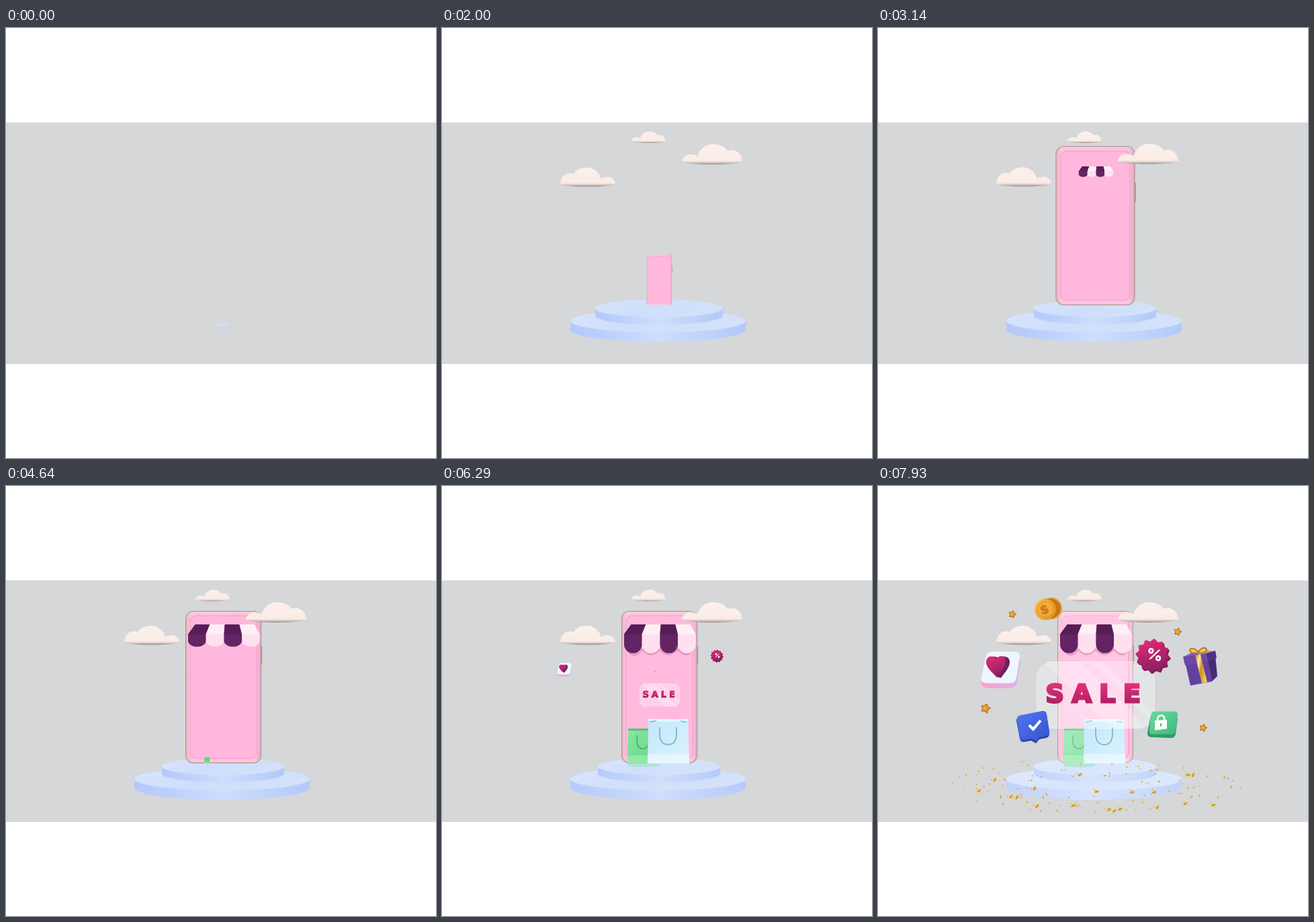
Write an HTML page that moves like this. It is 640 by 640 pixels and loops after 8 s.

```html
<!DOCTYPE html>
<html lang="en">
<head>
<meta charset="utf-8">
<title>Sale</title>
<style>
html, body { margin: 0; width: 100%; height: 100%; overflow: hidden; background: #fff; }
svg { display: block; width: 100%; height: 100%; }
text { text-anchor: middle; font: 900 20px Inter, Roboto, sans-serif; }
.a { animation: 8s ease-in-out infinite; }

#disc1 { transform-origin: 321.5px 442px; animation-name: disc1; }
#disc2 { transform-origin: 323px 423px; animation-name: disc2; }
#cloudL { transform-origin: 217px 222px; animation-name: cloudL; }
#cloudR { transform-origin: 402px 188px; animation-name: cloudR; }
#cloudT { transform-origin: 308px 163px; animation-name: cloudT; }
#phone { transform-origin: 323.5px 412px; animation-name: phone; }
#awning { transform-origin: 324.5px 206px; animation-name: awning; }
#drop { transform-origin: 324.5px 220px; animation-name: drop; }
#shade { animation-name: shade; }
#green { transform-origin: 299px 413px; animation-name: green; }
#strip { animation-name: strip; }
#blue { transform-origin: 337px 413px; animation-name: blue; }
#panel { transform-origin: 324px 311px; animation-name: panel; }
#heart { transform-origin: 182px 273px; animation-name: badge; }
#percent { transform-origin: 409px 253px; animation-name: badge; }
#coin { transform-origin: 253px 183px; animation-name: coin; }
#chat { transform-origin: 231px 357px; animation-name: chat; }
#tick { animation-name: tick; }
#lock { transform-origin: 423px 355px; animation-name: lock; }
#gift { transform-origin: 480px 269px; animation-name: gift; }
#confetti { transform-origin: 300px 355px; animation-name: confetti; }
.star { animation-name: star; }
.sheen { animation-name: sheen; }

@keyframes disc1 { 0% { transform: scale(.1) } 11.2% { transform: scale(1.1) } 16%, 100% { transform: none } }
@keyframes disc2 { 0%, 13% { transform: scale(0) } 22.5% { transform: scale(1.08) } 25% { transform: scale(1.044) } 28%, 100% { transform: none } }
@keyframes cloudL { 0% { transform: scale(.02) } 11.5% { transform: none } 39% { transform: translateY(-.6px) } 58%, 100% { transform: none } }
@keyframes cloudR { 0%, 10.5% { transform: scale(0) } 21% { transform: none } 39% { transform: translateY(-.6px) } 58%, 100% { transform: none } }
@keyframes cloudT { 0%, 13% { transform: scale(0) } 22.5%, 39% { transform: none } 58% { transform: translateY(.5px) } 68% { transform: none } 85.75%, 100% { transform: translateY(.5px) } }
@keyframes phone { 0%, 22.3% { transform: scale(0) } 25% { transform: scale(.33); animation-timing-function: ease-out } 34.5% { transform: scale(1.12) } 39.25% { transform: scale(1.045) } 43%, 100% { transform: none } }
@keyframes sheen { 0%, 76% { opacity: 0 } 84%, 100% { opacity: 1 } }
@keyframes awning { 0%, 36% { transform: scale(0) } 39.25% { transform: scale(.48) } 45%, 100% { transform: none } }
@keyframes drop { 0%, 57% { transform: scaleY(.65) } 64%, 100% { transform: none } }
@keyframes shade { 0%, 58% { opacity: 0 } 67%, 100% { opacity: 1 } }
@keyframes green { 0%, 57% { transform: scale(0) } 58% { transform: scale(.18) } 64% { transform: scale(1.08) } 67%, 100% { transform: none } }
@keyframes strip { 0%, 62% { opacity: 0 } 66%, 68% { opacity: .9 } 76%, 100% { opacity: .35 } }
@keyframes blue { 0%, 63% { transform: scale(0) } 67.9% { transform: scale(.86) } 71.5% { transform: scale(1.07) } 75%, 100% { transform: none } }
@keyframes panel { 0%, 75.7% { transform: scale(0) } 83.3% { transform: scale(1.1) } 85.75% { transform: scale(1.05) } 88.5%, 100% { transform: none } }
@keyframes badge { 0%, 76% { transform: scale(0) } 82.5% { transform: scale(1.08) } 85.75%, 100% { transform: none } }
@keyframes coin { 0%, 81% { transform: translate(50px, 42px) scale(0) } 85.75% { transform: translate(27px, 22px) scale(.82) } 92%, 100% { transform: none } }
@keyframes chat { 0%, 82% { transform: translate(28px, -26px) scale(0); opacity: .5 } 85.75% { transform: translate(11px, -10px) scale(.65); opacity: .8 } 92%, 100% { transform: none; opacity: 1 } }
@keyframes tick { 0%, 86% { opacity: 0 } 91%, 100% { opacity: 1 } }
@keyframes lock { 0%, 86.5% { transform: translate(-30px, -20px) scale(0) } 93% { transform: scale(1.06) } 95.5%, 100% { transform: none } }
@keyframes gift { 0%, 88% { transform: translate(-40px, 10px) scale(0) } 95% { transform: scale(1.06) } 99%, 100% { transform: none } }
@keyframes confetti { 0%, 77% { transform: scale(0); opacity: 0 } 82% { opacity: 1 } 85.75% { transform: scale(.69); opacity: 1; animation-timing-function: ease-out } 96.5%, 100% { transform: none; opacity: 1 } }
@keyframes star { 0%, 76% { transform: translate(var(--dx), var(--dy)) scale(0) } 85.75% { transform: translate(calc(var(--dx) * .19), calc(var(--dy) * .19)); animation-timing-function: ease-out } 94%, 100% { transform: none } }
</style>
</head>
<body>
<svg viewBox="0 0 640 640">
<defs>
  <linearGradient id="side">
    <stop offset="0" stop-color="#b4c9fb"/><stop offset=".2" stop-color="#bdd0fb"/>
    <stop offset=".5" stop-color="#cfdefd"/><stop offset="1" stop-color="#b3c9fa"/>
  </linearGradient>
  <linearGradient id="top" x2="1" y2=".3">
    <stop offset="0" stop-color="#d8e5fd"/><stop offset=".5" stop-color="#cfdefb"/><stop offset="1" stop-color="#d3e2f9"/>
  </linearGradient>
  <linearGradient id="puff" x2="0" y2="1">
    <stop offset="0" stop-color="#fdf1ec"/><stop offset=".82" stop-color="#faebe5"/><stop offset=".91" stop-color="#d8ccc7"/><stop offset="1" stop-color="#8c8381"/>
  </linearGradient>
  <linearGradient id="rim" x2="1" y2="0">
    <stop offset="0" stop-color="#e9b4c4"/><stop offset=".07" stop-color="#fac9d8"/><stop offset=".93" stop-color="#f8c8d7"/><stop offset="1" stop-color="#dfa9ba"/>
  </linearGradient>
  <linearGradient id="ink" x2="0" y2="1">
    <stop offset="0" stop-color="#f2317f"/><stop offset="1" stop-color="#a31d60"/>
  </linearGradient>
  <linearGradient id="mag" x2=".3" y2="1">
    <stop offset="0" stop-color="#ea2a78"/><stop offset="1" stop-color="#8f2062"/>
  </linearGradient>
  <linearGradient id="gold" x2="1" y2="1">
    <stop offset="0" stop-color="#ffc04a"/><stop offset="1" stop-color="#dd8a1e"/>
  </linearGradient>
  <linearGradient id="leaf" x2="1" y2="1">
    <stop offset="0" stop-color="#7fe59a"/><stop offset="1" stop-color="#56d57c"/>
  </linearGradient>
  <linearGradient id="sky" x2="1" y2="1">
    <stop offset="0" stop-color="#c3e8fa"/><stop offset="1" stop-color="#dcf3fd"/>
  </linearGradient>
  <linearGradient id="indigo" x2="1" y2="1">
    <stop offset="0" stop-color="#5277f4"/><stop offset="1" stop-color="#3553cf"/>
  </linearGradient>
  <linearGradient id="mint" x2="1" y2="1">
    <stop offset="0" stop-color="#6ddaa0"/><stop offset="1" stop-color="#3fb979"/>
  </linearGradient>
  <linearGradient id="under" x2="1">
    <stop offset="0" stop-color="#ff9ccf"/><stop offset="1" stop-color="#d9b4e8"/>
  </linearGradient>
  <linearGradient id="foil" x2="1" y2=".4">
    <stop offset="0" stop-color="#b87f18"/><stop offset=".35" stop-color="#ffe9a3"/><stop offset=".6" stop-color="#c98f1f"/><stop offset="1" stop-color="#f0c75c"/>
  </linearGradient>
  <path id="cloud" fill="url(#puff)" d="M0 27C0 20 5 15 13 15C17 15 20 16 23 18C27 6 36 0 47 0C57 0 65 4 68 10C77 6 90 11 90 27C70 31 20 31 0 27Z"/>
  <path id="starShape" fill="url(#gold)" stroke="#b9741f" stroke-width="1.200" stroke-linejoin="round"/>
  <path id="love" d="M177 285C169 276 161 270 161 262C161 253 171 251 176 257C181 250 191 253 190 262C189 271 182 277 177 285Z"/>
  <clipPath id="glass"><rect x="236" y="261" width="176" height="100" rx="26"/></clipPath>
</defs>

<rect y="140.5" width="640" height="359.5" fill="#d5d7d9"/>

<g class="a" id="disc1">
  <path fill="url(#side)" d="M191 437v12a130.5 18 0 0 0 261 0v-12z"/>
  <ellipse cx="321.5" cy="436" rx="130.5" ry="17" fill="url(#top)"/>
  <path class="a sheen" fill="#fff" fill-opacity=".2" d="M191 436a130.500 17 0 0 1 261 0v13a130.500 18 0 0 1-261 0z"/>
</g>
<g class="a" id="disc2">
  <path fill="url(#side)" d="M232 418v10a91 13 0 0 0 182 0v-10z"/>
  <ellipse cx="323" cy="417.5" rx="91" ry="12.8" fill="url(#top)"/>
  <path class="a sheen" fill="#fff" fill-opacity=".2" d="M232 417.500a91 12.800 0 0 1 182 0v10.500a91 13 0 0 1-182 0z"/>
</g>
<g class="a" id="confetti"></g>

<g class="a" id="cloudT"><use href="#cloud" transform="translate(282 154) scale(.565)"/></g>

<g class="a" id="phone">
  <path d="M380.3 238v28" stroke="#b78b98" stroke-width="1.6"/>
  <rect x="267.5" y="186.5" width="112" height="225.5" rx="11" fill="url(#rim)" stroke="#a98d96"/>
  <rect x="274" y="193" width="99" height="212.5" rx="9" fill="#ffb7dd" stroke="#ff92da"/>
  <g class="a sheen">
    <rect x="267.5" y="186.5" width="112" height="225.5" rx="11" fill="#fff" opacity=".22"/>
    <path d="M373 202v195a9 9 0 0 1-9 8.500" fill="none" stroke="#ff9ad8" stroke-width="1.500"/>
  </g>
</g>

<g class="a" id="awning">
  <g class="a" id="shade"><path d="M273 242q13 20 25 3q13 14 26 0q13 14 27 0q14 16 24-3z" fill="#b0517f" opacity=".3"/></g>
  <g class="a" id="drop"></g>
  <g id="roof"></g>
</g>

<g class="a" id="cloudL"><use href="#cloud" transform="translate(258 208) scale(-.91 .94)"/></g>
<g class="a" id="cloudR"><use href="#cloud" transform="translate(357 173)"/></g>

<path class="a" id="strip" d="M276 413h47v4q-22 3-47 0z" fill="#7edfa0"/>
<g class="a" id="green">
  <path d="M277 361h44l3 52h-48z" fill="url(#leaf)"/>
  <path d="M277 361h44l.3 3h-44z" fill="#48bf69"/>
  <path d="M275.500 401h48v12h-48z" fill="#a5f0b5" opacity=".6"/>
  <path d="M290 371v9q1 11 9 11t9-11v-9" fill="none" stroke="#2f9b57" stroke-width="1.400"/>
  <path class="a sheen" d="M277 361h44l3 52h-48z" fill="#e4f6f0" fill-opacity=".38"/>
</g>
<g class="a" id="blue">
  <path d="M307 347h59l2 66h-62z" fill="url(#sky)"/>
  <path d="M307 347h59v4h-59z" fill="#e3f6fe"/>
  <path d="M309 351l10-1.500M355 350l9 1.500" stroke="#72b8d4" stroke-width="1.500"/>
  <path d="M306.300 399h61.500v14h-61.800z" fill="#f1fbff" opacity=".65"/>
  <path d="M324 359v11q1 15 12.500 15t12.500-15v-11" fill="none" stroke="#6fb0cd" stroke-width="1.600"/>
</g>

<g transform="translate(200 191)"><use class="a star" href="#starShape" style="--dx:125px;--dy:26px"/></g>
<g transform="translate(446 217)"><use class="a star" href="#starShape" style="--dx:-111px;--dy:26px"/></g>
<g transform="translate(160 331) scale(1.250)"><use class="a star" href="#starShape" style="--dx:143px;--dy:-50px"/></g>
<g transform="translate(484 360)"><use class="a star" href="#starShape" style="--dx:-159px;--dy:-58px"/></g>

<g class="a" id="coin"><g transform="translate(253 183) rotate(-10)">
  <path d="M-5 -15.500h9a16 15.500 0 0 1 0 31h-9z" fill="#c47518"/>
  <path d="M6 -15.400a16 15.500 0 0 1 0 30.800" fill="none" stroke="#eda43a" stroke-width="2"/>
  <ellipse cx="-4" rx="16" ry="15.500" fill="url(#gold)"/>
  <ellipse cx="-4" rx="12" ry="11.500" fill="#f5aa3a" stroke="#e0921f"/>
  <text transform="translate(-4 6.500) rotate(-14)" font-weight="700" style="font-size:18px" fill="#c67b17">$</text>
</g></g>

<g class="a" id="panel">
  <g clip-path="url(#glass)" fill="#fff">
    <path d="M236 261h176v100h-176z" opacity=".34"/>
    <path d="M246 261h56l100 100h-56zM318 261h14l90 90v14z" opacity=".2"/>
  </g>
  <rect x="236.500" y="261.500" width="175" height="99" rx="26" fill="none" stroke="#fff" stroke-opacity=".3"/>
  <text x="326" y="322" fill="url(#ink)" stroke="url(#ink)" stroke-width="3"
    style="font: bold 38px 'DejaVu Sans', sans-serif; letter-spacing: 11.500px">SALE</text>
</g>

<g class="a" id="heart">
  <path d="M164 252h40q9 0 8 9l-5 31q-1 8-11 9h-29q-14-1-13-9z" fill="url(#under)"/>
  <path d="M170 246.500h33q9 0 8 9l-5 30q-1 8-10 8h-34q-10 0-8-9l6-29q2-9 10-9z" fill="#edf6fd"/>
  <g fill="#6d205f"><use href="#love" x="6" y="1"/><use href="#love" x="4" y=".7"/><use href="#love" x="2" y=".3"/></g>
  <use href="#love" fill="url(#mag)"/>
</g>

<g class="a" id="percent" stroke-linejoin="round" stroke-width="3">
  <path class="burst" transform="translate(410.500 254.500)" fill="#7f1c55" stroke="#7f1c55"/>
  <path class="burst" transform="translate(408.500 252.500)" fill="url(#mag)" stroke="url(#mag)"/>
  <text transform="translate(410 259) rotate(12)" style="font-size:23px" fill="#fff">%</text>
</g>

<g class="a" id="chat">
  <path d="M210 344l35-9q5 0 6 5l4 28q0 6-5 7l-10 2l-5 6l-7-4l-11 2q-5 0-6-5l-5-27q0-4 4-5z" fill="#2c459f"/>
  <path d="M213 341l31-6q6-1 7 5l4 25q1 6-5 7l-10 2l-5 6l-6-4l-11 2q-6 1-7-5l-4-25q-1-6 6-7z" fill="url(#indigo)"/>
  <path class="a" id="tick" d="M225 356l6 6l11-13" fill="none" stroke="#fff" stroke-width="4"/>
</g>

<g class="a" id="lock">
  <path d="M406 342l34-4l6 8l-3 23q-1 6-7 6l-28-1q-8 0-7-7z" fill="#2f9d66"/>
  <path d="M412 335.500h28q7 0 6 6l-3 22q-1 6-7 6h-27q-6 0-5-6l2-22q1-6 6-6z" fill="url(#mint)"/>
  <path d="M416 351v-4q1-5.500 5.500-5.500t5 5.500v4" fill="none" stroke="#fff" stroke-width="2.500"/>
  <path d="M412.500 349.500l17-1v12.500l-17 2z" fill="#fff" stroke="#fff" stroke-linejoin="round"/>
  <path d="M421 353v5" stroke="#45c584" stroke-width="2"/>
</g>

<g class="a" id="gift">
  <path d="M457 262l33-5l7 34l-32 6z" fill="#63409f"/>
  <path d="M490 257l12-5l3 31l-8 8z" fill="#472a78"/>
  <path d="M455 254l18-9l27 1l-12 6z" fill="#8259bb"/>
  <path d="M454 254l34-4l3 11l-34 6z" fill="#6d47aa"/>
  <path d="M488 250l14-5l2 11l-13 5z" fill="#523086"/>
  <path d="M472 252l8-1l10 41l-8 2z" fill="url(#foil)"/>
  <path d="M478 251l-8-5l20-2l7 2z" fill="#d9a93f"/>
  <path d="M477 248c-5-7-13-8-13-3c1 4 8 4 13 3c2-7 10-9 12-5c1 4-6 6-12 5z" fill="#f0c765" stroke="#b57f20" stroke-width="2"/>
</g>
</svg>

<script>
const $ = id => document.getElementById(id);
const add = (parent, tag, attrs) => {
  const el = parent.appendChild(document.createElementNS(parent.namespaceURI, tag));
  for (const k in attrs) el.setAttribute(k, attrs[k]);
};

const spikes = (n, outer, inner, turn) => 'M' + Array.from({ length: n * 2 }, (_, i) => {
  const r = i % 2 ? inner : outer, a = turn + i * Math.PI / n;
  return (r * Math.cos(a)).toFixed(2) + ' ' + (r * Math.sin(a)).toFixed(2);
}).join('L') + 'Z';
$('starShape').setAttribute('d', spikes(5, 5.6, 3.2, -1.3));
document.querySelectorAll('.burst').forEach(el => el.setAttribute('d', spikes(12, 23.8, 19.6, .1)));

// Awning stripes
for (let i = 0; i < 4; i++) {
  const x = 271 + i * 26.7, t = 281.5 + i * 22, dark = i % 2 === 0;
  add($('drop'), 'path', {
    d: `M${x} 220h26.700v15.500a13.350 13.300 0 0 1-26.700 0z`, fill: dark ? '#632463' : '#ffe0ee'
  });
  add($('roof'), 'path', {
    d: `M${t} 206h22L${x + 26.7} 220.500H${x}z`, fill: dark ? '#561d59' : '#fff0f5'
  });
}

// Gold confetti
let seed = 11;
const rnd = () => (seed = seed * 16807 % 2147483647) / 2147483647;
const chip = (x, y, w, h) => add($('confetti'), 'path', {
  d: `M${-w} ${-h}q${w} ${h} ${w * 2} 0l${-w * .3} ${h * 2}q${-w * .8} ${h * .6} ${-w * 1.5} 0z`,
  transform: `translate(${x} ${y}) rotate(${rnd() * 70 - 35})`, fill: 'url(#foil)'
});
for (let i = 0; i < 120; i++) {
  const a = rnd() * Math.PI * 2, r = Math.sqrt(.12 + rnd() * .88);
  const x = 322 + Math.cos(a) * r * 219, y = 446 + Math.sin(a) * r * 42;
  if (y < 412 && Math.abs(x - 323) < 60) continue;
  chip(x, y, .8 + rnd() * 1.2, .7 + rnd() * .8);
}
const big = [[150, 453], [173, 437], [197, 462], [206, 463], [236, 476], [290, 475], [325, 454], [343, 481],
  [351, 483], [360, 480], [378, 455], [411, 455], [415, 478], [461, 429], [468, 430], [457, 472], [499, 474], [300, 429], [232, 450]];
big.forEach(([x, y]) => chip(x, y, 4.4, 2.3));
</script>
</body>
</html>
```
